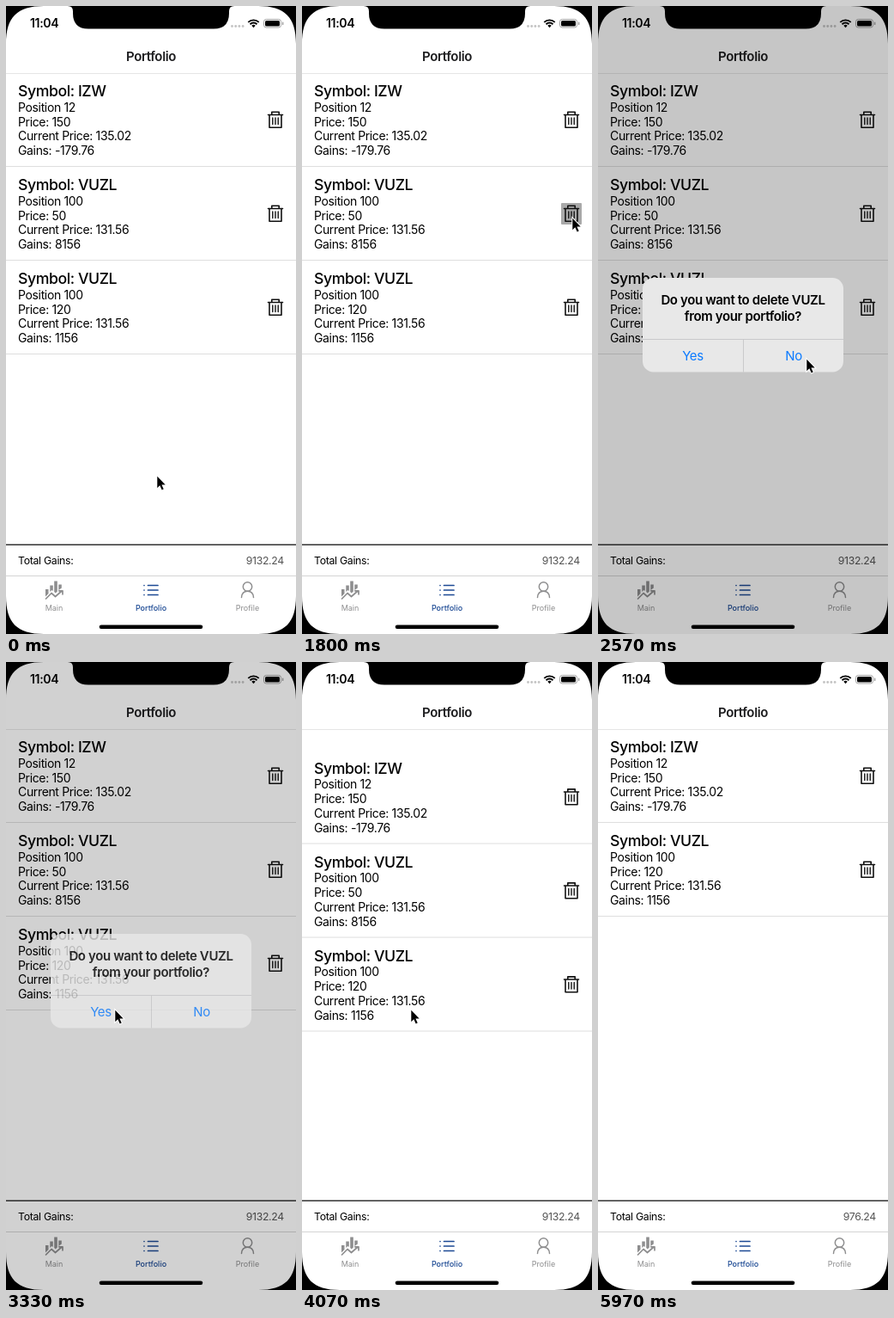
Write an HTML page that moves like this. It is 338 by 730 pixels and loops after 6.01 s.

```html
<!DOCTYPE html>
<html lang="en">
<head>
<meta charset="utf-8">
<title>Portfolio</title>
<style>
  html, body { margin: 0; width: 100%; height: 100%; overflow: hidden; background: #fff; }
  svg { display: block; width: 338px; height: 730px; }
  text { font: 14px Inter, "Liberation Sans", sans-serif; letter-spacing: -.025em; }
  .mid { text-anchor: middle; }
  .end { text-anchor: end; }
  .time { font-size: 14.1px; font-weight: 600; }
  .title { font-size: 15px; font-weight: 600; }
  .symbol { font-size: 17.7px; font-weight: 500; }
  .total { font-size: 12.3px; }
  .tab { font-size: 9px; letter-spacing: 0; fill: #8e8e8f; }
  .tab.on { font-weight: 500; fill: #1d4a94; }
  .button { font-size: 15px; fill: #0a7aff; }
  .line { fill: none; stroke-linecap: round; stroke-linejoin: round; }
</style>
</head>
<body>
<svg viewBox="0 0 338 730">
  <defs>
    <g id="trash" class="line" stroke="#111" stroke-width="1.6">
      <path d="M305.500 126.500H322.500M309.800 126.500V123.300H318.200V126.500M307 126.500V141.200H321V126.500"/>
      <path d="M310.800 130V137.500M314 130V137.500M317.200 130V137.500" stroke-width="1.400"/>
    </g>
  </defs>
  <rect width="338" height="730" fill="#fff"/>

  <text class="time" x="28" y="25">11:04</text>
  <g fill="#c4c4c4">
    <circle cx="263.500" cy="23.500" r="1.400"/><circle cx="267.700" cy="23.500" r="1.400"/>
    <circle cx="271.900" cy="23.500" r="1.400"/><circle cx="276.100" cy="23.500" r="1.400"/>
  </g>
  <path d="M288.500 25.200L286.300 22.700A3.200 3.200 0 0 1 290.700 22.700Z"/>
  <path d="M284.500 21.200A5.700 5.700 0 0 1 292.500 21.200M282.300 18.900A8.800 8.800 0 0 1 294.700 18.900" fill="none" stroke="#000" stroke-width="1.900"/>
  <rect x="300.500" y="15.500" width="20" height="9.500" rx="2.800" fill="none" stroke="#999" stroke-width=".9"/>
  <rect x="302" y="17" width="17" height="6.500" rx="1.500"/>
  <rect x="322" y="18.500" width="1.300" height="3.500" rx=".6" fill="#999"/>

  <text class="title mid" x="169" y="64" fill="#1c1c1e">Portfolio</text>
  <rect y="78" width="338" height="1" fill="#e6e6e6"/>

  <g id="list"></g>

  <rect y="625.500" width="338" height="1.500" fill="#333"/>
  <text class="total" x="14" y="649">Total Gains:</text>
  <text class="total end" id="total" x="324" y="649" fill="#555"></text>
  <rect y="662" width="338" height="1" fill="#d4d4d4"/>

  <g fill="#8e8e8f">
    <path d="M46 678h3.500v5l-3.500 3.500zM51.300 673.500h3.500v6.500l-1.500-1-2 2zM56.200 668.500h3.600v12l-2 2-1.600-1.500zM61.300 672.500h3.500v4l-3.500 2.500z"/>
    <path class="line" d="M46.500 689L53 682.500L57.500 686.500L65 680M61.800 679.800H66V683.800" stroke="#8e8e8f" stroke-width="1.700" style="fill:none"/>
  </g>
  <text class="tab mid" x="56" y="703">Main</text>
  <g class="line" stroke="#1d4a94" stroke-width="1.700">
    <path d="M165.500 673.500H177M165.500 679H177M165.500 684.500H177M161 673.500h.01M161 679h.01M161 684.500h.01"/>
  </g>
  <text class="tab on mid" x="169" y="703">Portfolio</text>
  <g class="line" stroke="#8e8e8f" stroke-width="1.500">
    <circle cx="281.500" cy="675" r="5.200"/>
    <path d="M274.500 687.500C274.800 682.800 277.800 680.300 281.500 680.300S288.200 682.800 288.500 687.500"/>
  </g>
  <text class="tab mid" x="281.500" y="703">Profile</text>
  <rect x="108.700" y="719.500" width="120.600" height="4.500" rx="2.250"/>

  <rect id="dim" width="338" height="730"/>
  <g id="alert">
    <rect x="52" y="316" width="234" height="109.500" rx="12.500" fill="#e8e8e8"/>
    <path d="M52 387.500H286M169.500 387.500V425.500" stroke="#c6c6c8" stroke-width=".9"/>
    <text class="title mid" x="169" y="347">Do you want to delete VUZL</text>
    <text class="title mid" x="169" y="366">from your portfolio?</text>
    <text class="button mid" x="110.500" y="412">Yes</text>
    <text class="button mid" x="228" y="412">No</text>
  </g>

  <path fill-rule="evenodd" d="M0 0H338V730H0ZM44 0C13 0 0 13 0 44V686C0 717 13 730 44 730H294C325 730 338 717 338 686V44C338 13 325 0 294 0Z"/>
  <path d="M72 0Q78 0 78 6V8.500Q78 26.500 96 26.500H242Q260 26.500 260 8.500V6Q260 0 266 0Z"/>
  <path id="cursor" d="M.3 .8V14.200L3.300 11.300L5.700 16.500L7.700 15.600L5.400 10.500H9.700Z" stroke="#fff" stroke-width="2" paint-order="stroke"/>
</svg>
<script>
const LOOP = 6010, ROW = 109;
const $ = id => document.getElementById(id);
const smooth = (t, a, b) => {
  const u = Math.min(1, Math.max(0, (t - a) / (b - a)));
  return u * u * (3 - 2 * u);
};

const holdings = [
  ['IZW', 12, 150, '135.02', '-179.76'],
  ['VUZL', 100, 50, '131.56', '8156'],
  ['VUZL', 100, 120, '131.56', '1156']
];

$('list').innerHTML = holdings.map(([symbol, count, price, current, gains]) => {
  const lines = [`Position ${count}`, `Price: ${price}`, `Current Price: ${current}`, `Gains: ${gains}`];
  return `<g>
    <rect class="press" x="302" y="120" width="24" height="25" rx="1" fill="#a9a9a9" visibility="hidden"/>
    <text class="symbol" x="14" y="105">Symbol: ${symbol}</text>
    ${lines.map((s, i) => `<text x="14" y="${122.8 + i * 16.8}">${s}</text>`).join('')}
    <use href="#trash"/>
    <rect y="186" width="338" height="1" fill="#dedede"/>
  </g>`;
}).join('');
const rows = [...$('list').children];
const press = rows[1].querySelector('.press');

// Pointer stops: time, x, y
const stops = [
  [0, 176, 546], [690, 176, 546], [770, 177, 548], [960, 177, 548],
  [1370, 314, 230], [1470, 315, 246], [2120, 315, 246], [2570, 243, 410],
  [2620, 243, 410], [2890, 104, 405], [3030, 127, 404], [4960, 127, 404], [5570, 24, 276]
];

function pointer(t) {
  const i = Math.max(1, stops.findIndex(s => s[0] > t));
  const [t0, x0, y0] = stops[i - 1], [t1, x1, y1] = stops[i];
  const u = smooth(t, t0, t1);
  return [x0 + (x1 - x0) * u, y0 + (y1 - y0) * u];
}

const show = (el, on) => el.setAttribute('visibility', on ? 'visible' : 'hidden');

function draw(t) {
  const removed = t >= 4370;
  const pull = t > 3690 && t < 4230 ? 38.5 * Math.sin(Math.PI * (t - 3690) / 540) ** 2 : 0;
  $('list').setAttribute('transform', `translate(0 ${pull})`);
  rows.forEach((row, i) => {
    const place = removed && i > 1 ? i - 1 : i;
    row.setAttribute('transform', `translate(0 ${place * ROW})`);
    row.style.display = removed && i === 1 ? 'none' : '';
  });
  show(press, t >= 1800 && t < 1950);
  $('total').textContent = removed ? '976.24' : '9132.24';

  const enter = smooth(t, 1890, 2300);
  const alpha = enter * (1 - smooth(t, 3215, 3620));
  const scale = 1.15 - .15 * enter;
  $('dim').setAttribute('opacity', .225 * alpha);
  $('alert').setAttribute('opacity', alpha);
  $('alert').setAttribute('transform', `translate(169 371) scale(${scale}) translate(-169 -371)`);

  const visible = t < 5570;
  show($('cursor'), visible);
  if (visible) $('cursor').setAttribute('transform', `translate(${pointer(t)})`);
}

const start = performance.now();
function frame() {
  draw((performance.now() - start) % LOOP);
  requestAnimationFrame(frame);
}
frame();
</script>
</body>
</html>
```
